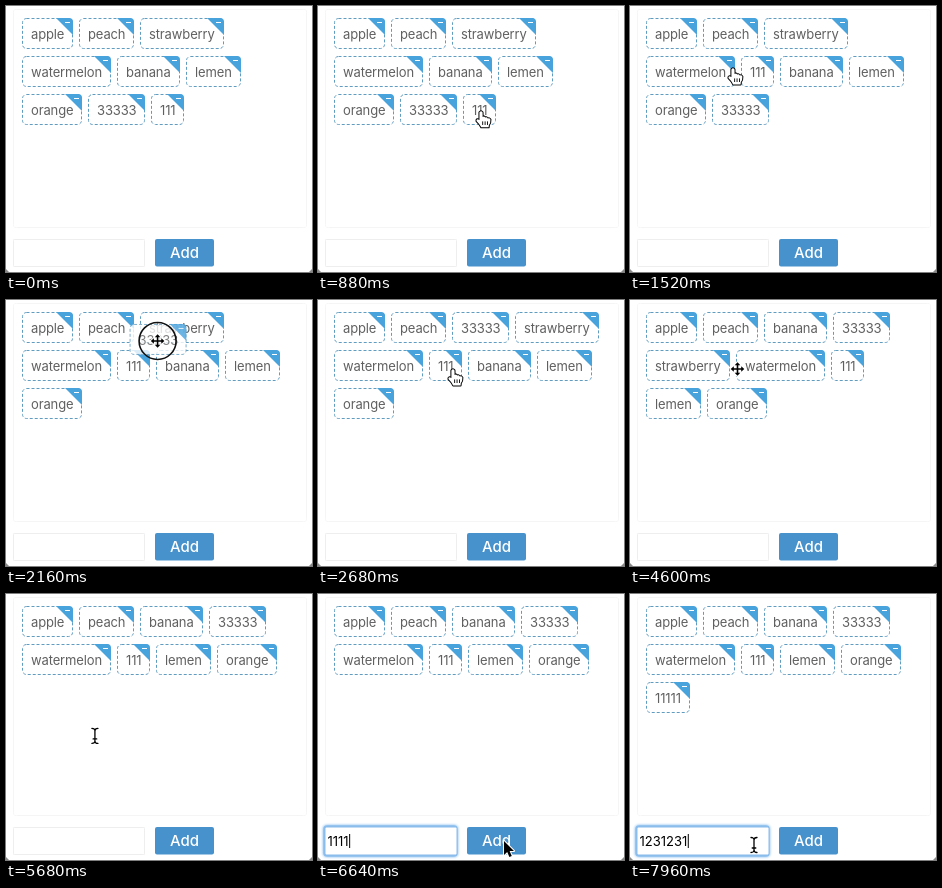
Animation of 306 by 266 pixels, one loop 8 s. Source, as an HTML page with a canvas:

```html
<!DOCTYPE html>
<html lang="en">
<head>
<meta charset="utf-8">
<title>Draggable tags</title>
<style>
  html, body { margin: 0; width: 100%; height: 100%; overflow: hidden; background: #fff; }
  canvas { display: block; width: 306px; height: 266px; }
</style>
</head>
<body>
<canvas id="stage"></canvas>
<script>
const W = 306, H = 266, LOOP = 8000;
const canvas = document.getElementById('stage');
const ctx = canvas.getContext('2d');
const ratio = window.devicePixelRatio || 1;
canvas.width = W * ratio;
canvas.height = H * ratio;

const FONT = 'Inter, "Open Sans", sans-serif';
const TAG_FONT = { size: 13, color: '#606060', spacing: -0.13 };
const BLUE = '#4792cc', CORNER = '#48a2dc', DASH = '#5f9cc0';
const LEFT = 16, TOP = 12, RIGHT = 293, TAG_H = 31, GAP = 6, PITCH = 38, PAD = 9;
const TRAVEL = 450, HOLD = 120;

const firstTags = ['apple', 'peach', 'strawberry', 'watermelon', 'banana',
  'lemen', 'orange', '33333', '111'];

// The pointer reaches each cue at `at`; a drag or click takes effect there.
const cues = [
  { at: -HOLD, x: 172, y: 290, look: 'arrow' },
  { at: 900, x: 163, y: 104, look: 'hand' },
  { at: 1300, x: 121, y: 64, look: 'move', drag: '111', slot: 4 },
  { at: 1520, x: 103, y: 62, look: 'hand' },
  { at: 1760, x: 110, y: 105, look: 'hand' },
  { at: 2260, x: 160, y: 28, look: 'move', drag: '33333', slot: 2 },
  { at: 2680, x: 135, y: 69, look: 'hand' },
  { at: 2880, x: 181, y: 68, look: 'hand' },
  { at: 3400, x: 132, y: 35, look: 'move', drag: 'banana', slot: 2 },
  { at: 4600, x: 107.5, y: 69, look: 'move' },
  { at: 5080, x: 93, y: 54, look: 'hand', click: true, remove: 'strawberry' },
  { at: 5920, x: 84, y: 248, look: 'beam', click: true },
  { at: 6560, x: 186, y: 247, look: 'arrow' },
  { at: 6860, x: 186, y: 247, look: 'arrow', click: true, add: '11111' },
  { at: 7280, x: 124, y: 251, look: 'beam', click: true },
  { at: LOOP, x: 124, y: 251, look: 'beam' }
];

const entries = [
  { focus: 5920, start: 6040, step: 160, end: 6860, text: '11111' },
  { focus: 7280, start: 7400, step: 80, end: LOOP, text: '1231231' }
];

function setFont(size, weight = 400, spacing = 0) {
  ctx.font = `${weight} ${size}px ${FONT}`;
  ctx.letterSpacing = `${spacing}px`;
}

function label(text, x, y, { size, color, weight, spacing }) {
  setFont(size, weight, spacing);
  ctx.fillStyle = color;
  ctx.fillText(text, x, y);
}

function tagWidth(name) {
  setFont(TAG_FONT.size, 400, TAG_FONT.spacing);
  return Math.round(ctx.measureText(name).width) + 2 * PAD;
}

function tagsAt(t) {
  let tags = firstTags.slice();
  for (const { at, drag, slot, remove, add } of cues) {
    if (at > t) break;
    tags = tags.filter(name => name !== drag && name !== remove);
    if (drag) tags.splice(slot, 0, drag);
    if (add) tags.push(add);
  }
  return tags;
}

function layout(t) {
  let x = LEFT, y = TOP;
  return tagsAt(t).map(name => {
    const w = tagWidth(name);
    if (x + w > RIGHT) { x = LEFT; y += PITCH; }
    const place = { name, x, y };
    x += w + GAP;
    return place;
  });
}

function pointerAt(t) {
  const i = cues.findIndex(c => t < c.at + HOLD);
  const cue = cues[i], prev = cues[i - 1];
  const start = Math.max(prev.at + HOLD, cue.at - TRAVEL);
  const k = Math.min(1, Math.max(0, (t - start) / (cue.at - start)));
  const ease = k * k * (3 - 2 * k);
  return {
    cue, prev,
    x: prev.x + (cue.x - prev.x) * ease,
    y: prev.y + (cue.y - prev.y) * ease,
    pressed: cue.drag || (cue.click && t >= cue.at)
  };
}

function box(x, y, w, h, r) {
  ctx.beginPath();
  ctx.roundRect(x, y, w, h, r);
}

function poly(points) {
  ctx.beginPath();
  for (let i = 0; i < points.length; i += 2) ctx.lineTo(points[i], points[i + 1]);
  ctx.closePath();
}

function paint(fill, stroke, width = 1) {
  ctx.lineJoin = 'round';
  ctx.lineWidth = width;
  ctx.strokeStyle = stroke;
  ctx.stroke();
  ctx.fillStyle = fill;
  ctx.fill();
}

function drawTag(name, x, y) {
  const w = tagWidth(name), end = x + w;
  box(x + 0.5, y + 0.5, w - 1, TAG_H - 1, 4);
  ctx.fillStyle = '#fff';
  ctx.fill();
  ctx.strokeStyle = DASH;
  ctx.lineWidth = 1;
  ctx.setLineDash([3, 2]);
  ctx.stroke();
  ctx.setLineDash([]);
  label(name, x + PAD, y + 21, TAG_FONT);

  ctx.save();
  box(x, y, w, TAG_H, 4);
  ctx.clip();
  poly([end - 17, y, end, y, end, y + 17]);
  ctx.fillStyle = CORNER;
  ctx.fill();
  ctx.restore();
  ctx.fillStyle = '#fff';
  ctx.fillRect(end - 8, y + 4, 5, 1);
}

function drawForm(t) {
  const entry = entries.find(e => t >= e.focus && t < e.end);
  if (entry) {
    ctx.save();
    ctx.shadowColor = '#4a9be6';
    ctx.shadowBlur = 3 * ratio;
    box(5.5, 231.5, 134, 31, 3);
    ctx.fillStyle = '#8abcec';
    ctx.fill();
    ctx.restore();
  }
  box(7.5, 233.5, 131, 27, 1);
  paint('#fff', entry ? '#8abcec' : '#ddd');
  if (entry) {
    const count = Math.max(0, Math.floor((t - entry.start) / entry.step) + 1);
    const text = entry.text.slice(0, count);
    label(text, 9.5, 251.5, { size: 13, color: '#000' });
    ctx.fillRect(10 + ctx.measureText(text).width, 240, 1, 14);
  }

  box(149, 233, 59, 27.5, 2);
  ctx.fillStyle = BLUE;
  ctx.fill();
  label('Add', 164, 252, { size: 15, color: '#fff', weight: 500 });
}

const shapes = {
  arrow() {
    poly([0, 0, 0, 14, 3.2, 11, 5.4, 16, 7.8, 15, 5.6, 10, 10, 10]);
    paint('#000', '#fff', 2);
  },
  hand() {
    ctx.beginPath();
    ctx.moveTo(-1.6, 9);
    ctx.lineTo(-1.6, 1.4);
    ctx.quadraticCurveTo(0, -0.8, 1.5, 1.4);
    ctx.lineTo(1.6, 6);
    for (let i = 0; i < 3; i++) {
      const x = 1.6 + 2.6 * i;
      ctx.quadraticCurveTo(x + 1.6, 4.6 + i, x + 2.6, 6.6 + i);
    }
    ctx.quadraticCurveTo(9.6, 12.5, 7.8, 14.2);
    ctx.lineTo(7.6, 16.4);
    ctx.lineTo(0.2, 16.4);
    ctx.quadraticCurveTo(-1.2, 13.2, -4.6, 10);
    ctx.quadraticCurveTo(-4.8, 7.2, -1.6, 9);
    paint('#fff', '#000', 2);
    ctx.fillStyle = '#000';
    for (let i = 0; i < 3; i++) ctx.fillRect(1.2 + 2.4 * i, 10.4, 0.9, 3.6);
  },
  move() {
    const arm = [[-0.8, -0.8], [-0.8, -3.7], [-2.8, -3.7], [0, -6.8], [2.8, -3.7], [0.8, -3.7]];
    const points = [];
    let c = 1, s = 0;
    for (let i = 0; i < 4; i++) {
      for (const [x, y] of arm) points.push(x * c - y * s, x * s + y * c);
      [c, s] = [-s, c];
    }
    poly(points);
    paint('#000', '#fff', 2);
  },
  beam() {
    ctx.lineCap = 'round';
    for (const [color, width] of [['#fff', 3], ['#000', 1.3]]) {
      ctx.beginPath();
      for (const s of [-1, 1]) {
        ctx.moveTo(-3, 7.5 * s);
        ctx.quadraticCurveTo(0, 7.5 * s, 0, 5 * s);
        ctx.quadraticCurveTo(0, 7.5 * s, 3, 7.5 * s);
      }
      ctx.moveTo(0, -5);
      ctx.lineTo(0, 5);
      ctx.moveTo(-1.8, 3);
      ctx.lineTo(1.8, 3);
      ctx.strokeStyle = color;
      ctx.lineWidth = width;
      ctx.stroke();
    }
  }
};

function drawPointer({ cue, x, y, pressed }) {
  ctx.save();
  ctx.translate(x, y);
  if (pressed) {
    ctx.beginPath();
    ctx.arc(0, 0, 18.5, 0, Math.PI * 2);
    ctx.strokeStyle = '#111';
    ctx.lineWidth = 1.6;
    ctx.stroke();
  }
  shapes[cue.look]();
  ctx.restore();
}

function drawGhost({ cue, prev, x, y }) {
  const home = layout(prev.at).find(tag => tag.name === cue.drag);
  ctx.globalAlpha = 0.8;
  drawTag(cue.drag, home.x + x - prev.x, home.y + y - prev.y);
  ctx.globalAlpha = 1;
}

function draw(t) {
  ctx.setTransform(ratio, 0, 0, ratio, 0, 0);
  ctx.fillStyle = '#fff';
  ctx.fillRect(0, 0, W, H);
  box(7.5, 3.5, 293, 218, 3);
  paint('#fff', '#ebebeb');

  const pointer = pointerAt(t);
  for (const { name, x, y } of layout(t))
    if (name !== pointer.cue.drag) drawTag(name, x, y);
  drawForm(t);
  if (pointer.cue.drag) drawGhost(pointer);
  drawPointer(pointer);

  // Rounded window corners
  ctx.fillStyle = '#8a8a8a';
  for (const [x, inner] of [[0, 3], [W, W - 3]]) {
    poly([x, H - 3, x, H, inner, H]);
    ctx.fill();
  }
}

const start = performance.now();
function frame() {
  draw((performance.now() - start) % LOOP);
  requestAnimationFrame(frame);
}
frame();
</script>
</body>
</html>
```
